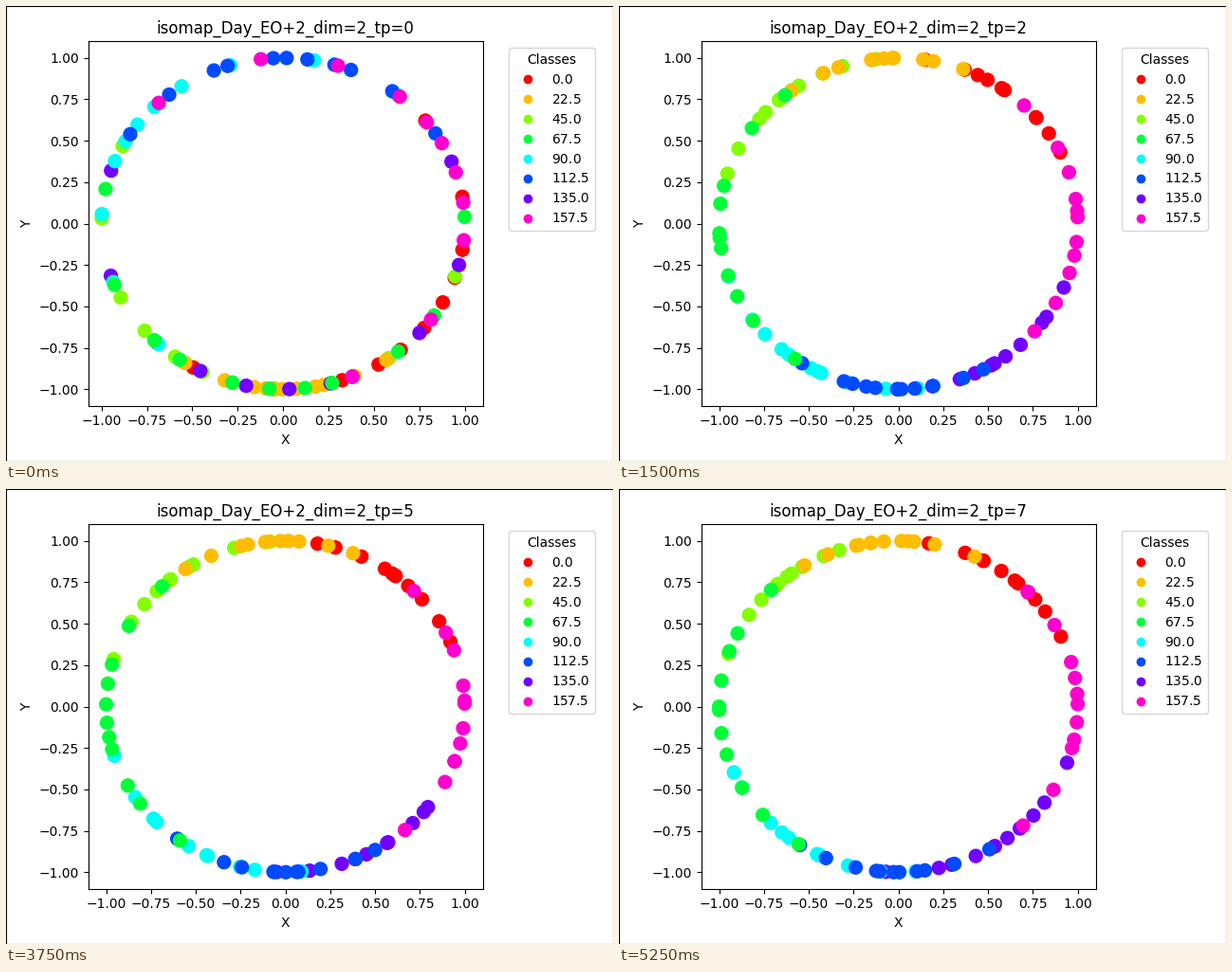
Recreate the animation shown at these times as a matplotlib script. Size 640 by 480 pixels, loop 6 s.

```python
import numpy as np
import matplotlib.pyplot as plt
from matplotlib.animation import FuncAnimation

STEP = 22.5                             # spacing of the class values
TRIALS = 11                             # points per class
PAINT_ORDER = [0, 2, 1, 6, 4, 5, 3, 7]  # later classes lie on top

# Centre and reach of each class on the unit circle, in degrees
MIXED = [(-40, 80), (-88, 33), (-115, 93), (-96, 100),
         (140, 90), (90, 58), (-90, 110), (30, 100)]
FORMING = [(0, 43), (76, 29), (105, 55), (155, 58),
           (165, 40), (240, 45), (262, 42), (300, 38)]
SETTLED = [(52, 27), (96, 28), (130, 32), (185, 52),
           (238, 38), (268, 33), (304, 36), (0, 45)]
FLIPPED = [(180 - centre, reach) for centre, reach in SETTLED]

# Layout of each step with its horizontal extent
FULL = (-1, 1)
STEPS = ([(MIXED, (-0.975, 1)), (FORMING, FULL), (SETTLED, FULL)]
         + [(FLIPPED, (-1, 0.988))] * 2
         + [(SETTLED, FULL)] * 3)


def cluster(centre, reach, rng):
    """Angles crowded around the centre and thinning out to the reach."""
    u = np.linspace(-1, 1, TRIALS)
    return centre + reach * (u + u**3) / 2 + rng.normal(0, 2.5, TRIALS)


fig, ax = plt.subplots(figsize=(6.4, 4.8), dpi=100)


def draw(tp):
    layout, (left, right) = STEPS[tp]
    rng = np.random.default_rng(tp)
    theta = np.radians([cluster(*layout[k], rng) for k in PAINT_ORDER]).ravel()
    classes = np.repeat(PAINT_ORDER, TRIALS) * STEP
    pad = 0.05 * (right - left)

    ax.clear()
    dots = ax.scatter(np.cos(theta), np.sin(theta), c=classes, s=100,
                      cmap="hsv", vmin=0, vmax=180)
    ax.set(xlim=(left - pad, right + pad), ylim=(-1.1, 1.1),
           xlabel="X", ylabel="Y", title=f"isomap_Day_EO+2_dim=2_tp={tp}")
    ax.legend(*dots.legend_elements(), title="Classes",
              bbox_to_anchor=(1.05, 1), loc="upper left")


draw(0)
fig.tight_layout()

# Thin frame around the whole stage
fig.add_axes([0, 0, 1, 1], facecolor="none", xticks=[], yticks=[])

anim = FuncAnimation(fig, draw, frames=len(STEPS), init_func=lambda: None,
                     interval=750, repeat=True, repeat_delay=0)
plt.show()
```
